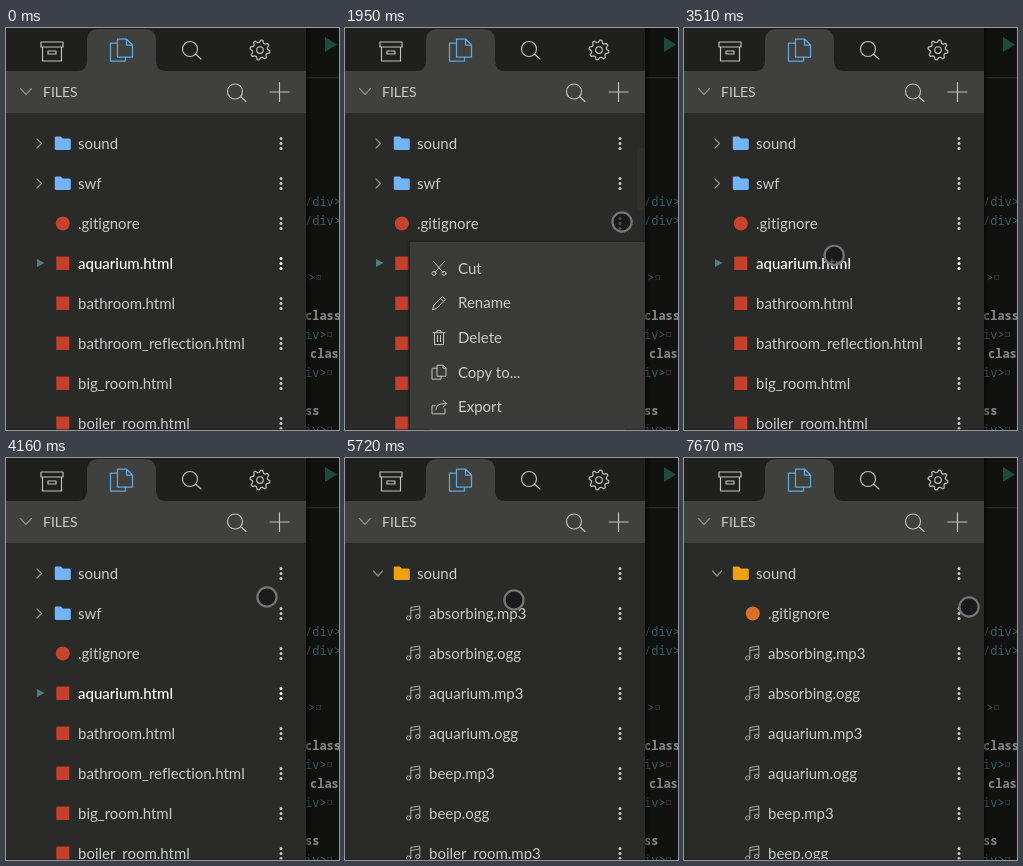
An HTML page that plays this animation: 333x402 px, repeating every 8000 ms.

```html
<!DOCTYPE html>
<html lang="en">
<head>
<meta charset="utf-8">
<title>File tree</title>
<style>
  html, body { margin: 0; width: 100%; height: 100%; overflow: hidden; background: #111; }
  svg { display: block; }
  text { font: 15px Lato, sans-serif; fill: #c9cbcb; white-space: pre; font-variant-ligatures: none; }
  .code { font: 12px "Noto Sans Mono", monospace; }
  .line { fill: none; stroke: #c2c3c2; stroke-width: 1.15; stroke-linecap: round; stroke-linejoin: round; }
</style>
</head>
<body>
<svg id="stage" width="333" height="402" viewBox="0 0 333 402"></svg>
<script>
const stage = document.getElementById('stage');
const ROW = 40, FIRST = 115.5, ITEM = 34.6;

const rect = (x, y, w, h, fill, extra = '') =>
  `<rect x="${x}" y="${y}" width="${w}" height="${h}" fill="${fill}" ${extra}/>`;
const text = (x, y, s, extra = '') => `<text x="${x}" y="${y}" ${extra}>${s}</text>`;
const at = (x, y, body) => `<g transform="translate(${x} ${y})">${body}</g>`;
const line = (d, extra = '') => `<path class="line" d="${d}" ${extra}/>`;
const search = (x, y) => at(x, y, line('M5.5 0A7.5 7.5 0 1 1 -9.5 0A7.5 7.5 0 1 1 5.5 0M3.5 5L9 10'));

const PAGES = 'M-4 -7V-11H5L11 -5V7H-4V-7M5 -11V-5H11M-4 -7H-11V11H4V7';
const BOX = 'M-11 -9H11V-4H-11ZM-9.5 -4V10H9.5V-4M-4 0H4V3H-4Z';

function gear() {
  const points = [];
  for (let i = 0; i < 32; i++) {
    const a = (i + .5) * Math.PI / 16, r = i % 4 < 2 ? 10 : 7.6;
    points.push((r * Math.cos(a)).toFixed(2) + ' ' + (r * Math.sin(a)).toFixed(2));
  }
  return line('M' + points.join('L') + 'ZM3.3 0A3.3 3.3 0 1 1 -3.3 0A3.3 3.3 0 1 1 3.3 0');
}

function editor() {
  const tag = 'fill:#3a5a63', attribute = 'fill:#858a8a;font-weight:600';
  const words = [
    [174, '/div>', tag], [193, '/div>', tag], [250, '&gt;', tag, 302],
    [288, 'class', attribute], [307, 'iv>', tag], [326, 'class', attribute, 304],
    [345, 'iv>', tag], [383, 'ss', attribute], [402, 'iv>', tag]
  ];
  const mark = (x, y) => text(x, y + 4, '¤', 'class="code" style="fill:#3b352c"');
  return rect(300, 0, 33, 402, '#11110f') + rect(300, 49, 33, 1.5, '#252625') +
    '<path d="M319 9L331 16.5L319 24Z" fill="#1d4b3d"/>' +
    words.map(([y, s, style, x = 299]) =>
      text(x, y + 4, s, `class="code" style="${style}"`)).join('') +
    mark(309, 250) + mark(320, 307) + mark(320, 345) + mark(320, 402) +
    rect(300, 0, 6, 402, 'url(#shade)');
}

function toolbar() {
  return rect(0, 0, 300, 44, '#1f1f1e') +
    '<path d="M71 43Q81 43 81 33V13Q81 1 93 1H138Q150 1 150 13V33Q150 43 160 43Z" fill="#40403e"/>' +
    rect(0, 43, 300, 42, '#40403e') +
    at(46, 23, line(BOX)) + at(115.5, 22, line(PAGES, 'style="stroke:#5fa8e0;stroke-width:1.25"')) +
    search(186, 21) + at(254, 22, gear()) +
    line('M14.5 60.5L20 66.5L25.5 60.5', 'style="stroke:#8d8d8b"') +
    text(37, 69, 'FILES', 'style="font-size:14px"') +
    search(231, 63.5) + line('M264 64H283M273.5 54.5V73.5');
}

const icons = {
  folder: color => `<path d="M-8 -6Q-8 -7 -7 -7H-2L0 -5H6.5Q8 -5 8 -3.5V5Q8 6.5 6.5 6.5H-6.5Q-8 6.5 -8 5Z" fill="${color}"/>`,
  page: () => rect(-6.5, -7, 13, 13.5, '#c4402d'),
  repo: color => `<circle r="7" fill="${color}"/>`,
  music: () => line('M-3 4.5V-6L6 -7.5V3M-3 -3L6 -4.5M-3 4.5A2.1 2.1 0 1 1 -7.2 4.5A2.1 2.1 0 1 1 -3 4.5M6 3A2.1 2.1 0 1 1 1.8 3A2.1 2.1 0 1 1 6 3',
    'style="stroke:#a9aaa9;stroke-width:1"')
};

function row(i, [kind, name, color], nested) {
  const indent = nested && i ? 12 : 0, current = name === 'aquarium.html';
  const ink = current ? '#fff' : '#c9cbcb';
  let lead = '';
  if (kind === 'folder')
    lead = line(nested ? 'M28.5 -2.5L33 2.5L37.5 -2.5' : 'M31 -4.5L35.5 0L31 4.5', 'style="stroke:#92928f"');
  if (current) lead = '<path d="M31 -4.5L38.5 -.5L31 3.5Z" fill="#4b8083"/>';
  return at(0, FIRST + i * ROW, lead + at(56.8 + indent, 0, icons[kind](color)) +
    text(72 + indent, 5.5, name, `style="fill:${ink};font-weight:${current ? 500 : 400}"`) +
    [-5, 0, 5].map(y => `<circle cx="275" cy="${y}" r="1.5" fill="${ink}"/>`).join(''));
}

const list = (id, rows, nested) =>
  `<g id="${id}">${rows.map((r, i) => row(i, r, nested)).join('')}</g>`;

const pages = ['aquarium', 'bathroom', 'bathroom_reflection', 'big_room', 'boiler_room']
  .map(n => ['page', n + '.html']);
const sounds = ['absorbing', 'aquarium', 'beep', 'boiler_room']
  .flatMap(n => [['music', n + '.mp3'], ['music', n + '.ogg']]);
const openFolder = ['folder', 'sound', '#eea213'];
const closedRows = [['folder', 'sound', '#72b4f6'], ['folder', 'swf', '#72b4f6'],
  ['repo', '.gitignore', '#c7432e'], ...pages];

const actions = {
  'Cut': 'M-5.5 -7L4 4M5.5 -7L-4 4M-3 5A2 2 0 1 1 -7 5A2 2 0 1 1 -3 5M7 5A2 2 0 1 1 3 5A2 2 0 1 1 7 5',
  'Paste': 'M-3 -5H-6V7H6V-5H3M-3 -7H3V-3H-3Z',
  'Rename': 'M-6.5 6.5L-5 2L3.5 -6.5L6.5 -3.5L-2 5ZM1.5 -4.5L4.5 -1.5',
  'Delete': 'M-6 -5H6M-2 -5V-7H2V-5M-4.5 -5V7H4.5V-5M-1.5 -2V4M1.5 -2V4',
  'Copy to...': 'M-2 -4V-7H4L7 -4V4H-2V-4M4 -7V-4H7M-2 -4H-7V7H2V4',
  'Export': 'M-4 -1H-7V7H6V2M-3 3Q-3 -3 4 -3H7M4 -6.5L7.5 -3L4 .5'
};

function menu(id, top, names) {
  return `<g id="${id}">` + rect(62, top - 2, 238, 402, '#000', 'opacity=".15"') +
    rect(65, top, 235, 402, '#3a3a39') +
    names.map((n, i) => at(94, top + 26.4 + i * ITEM,
      line(actions[n], 'style="stroke-width:1"') + text(19, 5.4, n))).join('') +
    rect(85, top + 14 + names.length * ITEM, 195, 1, '#6a6a68') + '</g>';
}

const allActions = Object.keys(actions);
stage.innerHTML =
  '<defs><linearGradient id="shade"><stop stop-color="#000" stop-opacity=".5"/><stop offset="1" stop-opacity="0"/></linearGradient></defs>' +
  editor() + rect(0, 0, 300, 402, '#2a2a29') + toolbar() +
  list('closed', closedRows) +
  list('opened', [openFolder, ...sounds], true) +
  list('moved', [openFolder, ['repo', '.gitignore', '#d9702a'], ...sounds], true) +
  rect(292, 120, 8, 62, '#4b4b4a', 'id="thumb" rx="3"') +
  menu('fileMenu', 214, allActions.filter(n => n !== 'Paste')) +
  menu('folderMenu', 134, allActions) +
  rect(0, 401, 300, 1, '#1f1f1e', 'opacity=".6"') +
  '<circle id="pointer" r="9.6" fill="#131317" fill-opacity=".68" stroke="#767674" stroke-width="2.2"/>';

const part = id => document.getElementById(id);
const show = (id, on) => part(id).style.display = on ? '' : 'none';

// Pointer stops: time, x, y
const path = [
  [260, 346, 258], [780, 328, 218], [1430, 277, 194], [1950, 277, 194],
  [2860, 155, 265], [3120, 128, 245], [3380, 128, 245], [4160, 261, 139],
  [4420, 273, 119], [5330, 166, 137], [5590, 166, 137], [5720, 169, 142], [6240, 275, 117],
  [6370, 275, 117], [6760, 190, 192], [7020, 190, 192], [7670, 285, 149], [8000, 285, 149]
];

function pointerAt(t) {
  const i = Math.max(1, path.findIndex(p => p[0] >= t));
  const [t0, x0, y0] = path[i - 1], [t1, x1, y1] = path[i];
  const k = (t - t0) / (t1 - t0);
  return [x0 + (x1 - x0) * k, y0 + (y1 - y0) * k];
}

function draw(now) {
  const t = Math.min(7670, Math.floor(now % 8000 / 130) * 130);
  show('closed', t < 5720);
  show('opened', t >= 5720 && t < 7150);
  show('moved', t >= 7150);
  show('fileMenu', t >= 1950 && t < 3510);
  show('folderMenu', t >= 6500 && t < 7150);
  show('thumb', t >= 1950 && t < 3510);
  part('thumb').setAttribute('opacity', Math.min(1, .2 + (t - 1950) / 325));
  show('pointer', t >= 390);
  if (t >= 390) part('pointer').setAttribute('transform', `translate(${pointerAt(t)})`);
}

const start = performance.now();
function tick() {
  draw(performance.now() - start);
  requestAnimationFrame(tick);
}
tick();
</script>
</body>
</html>
```
